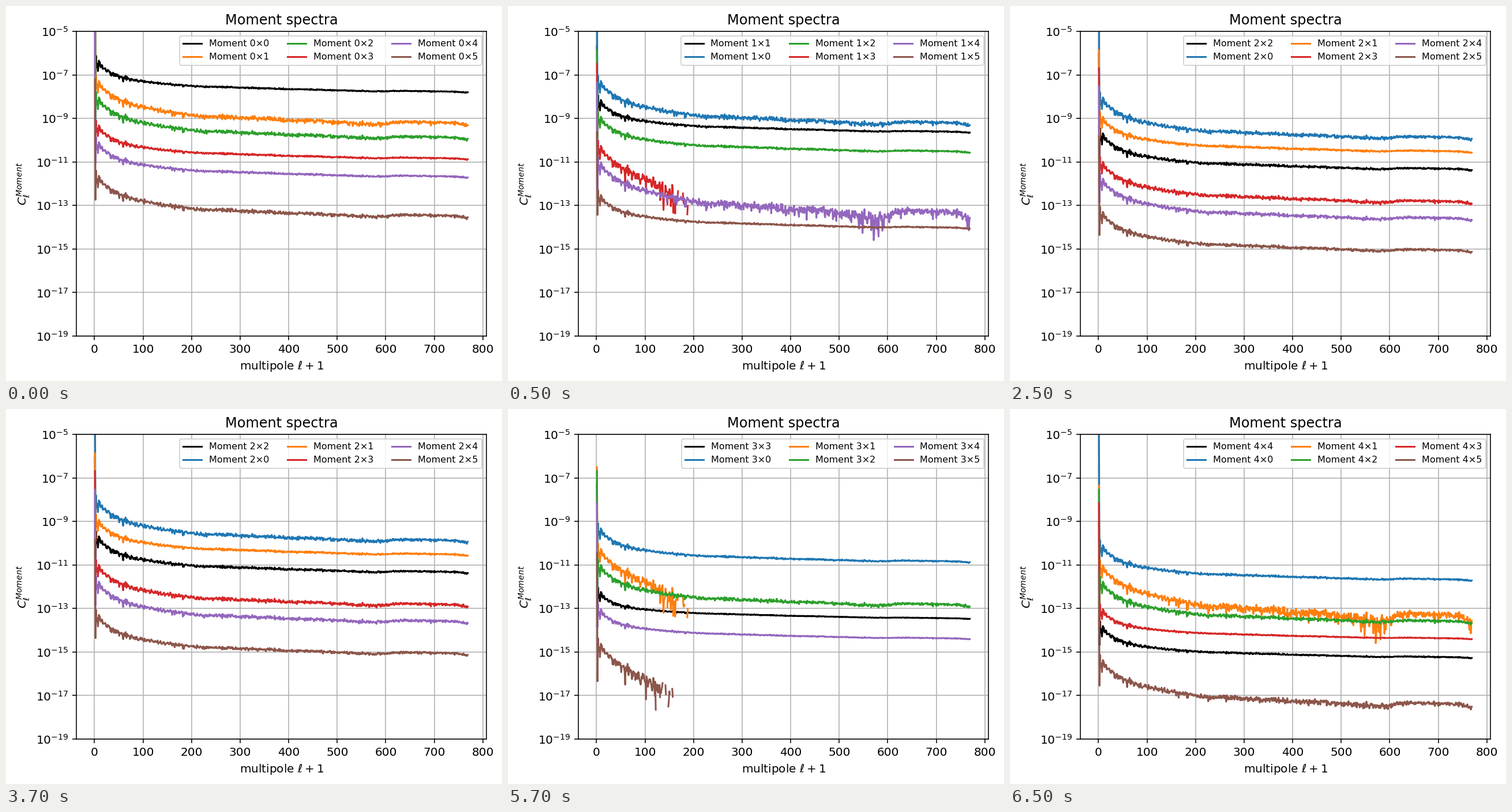
A matplotlib script for the animation above (8 s loop, 860 by 651 pixels).

```python
import numpy as np
import matplotlib.pyplot as plt
from matplotlib.animation import FuncAnimation

WIDTH, HEIGHT, DPI = 860, 651, 144
STEP, FRAMES, MOMENTS = 500, 16, 6

# log10 scale of each moment on the sky and in the monopole
SKY = [-3.24, -4.14, -4.90, -6.20, -6.97, -8.50]
MONOPOLE = [-0.4, -2.84, -3.03, -3.66, -4.51, -6.8]

# How strongly the noise floor of moment i couples to moments i, i+1, ...
COUPLING = [
    [0.36, -0.26, -0.20, 0.17, 0.08, -0.20],
    [0.28, 0.06, -0.66, -0.41, 0.20],
    [0.0, -0.19, -0.19, -0.14],
    [1.0, 0.55, -0.72],
    [0.34, -0.31],
]

rng = np.random.default_rng(12)
multipole = np.arange(1, 770)
modes = 2 * multipole - 1
scatter = np.sqrt(2 / modes)

ripple = np.interp(multipole, [60, 120, 220, 300, 450, 570, 640, 740, 769],
                   [0, -0.006, -0.005, 0, 0, -0.003, 0.002, 0.002, -0.002])
sky = 10 / np.maximum(multipole, 10) + 0.015 + ripple
sky *= rng.chisquare(modes) / modes
sky[1] = 0.13
sky[58] *= 0.55
floor = 0.15 * (1 + multipole / 180) ** -0.58


def make_spectrum(i, j):
    """Sky signal common to all moments plus a coupled noise floor."""
    jitter = 0.25 * scatter * rng.standard_normal(multipole.size)
    jitter[:9] = 0
    power = sky + floor * (COUPLING[i][j - i] + jitter)
    spectrum = 10 ** (SKY[i] + SKY[j]) * np.where(power > 0, power, np.nan)
    spectrum[0] = 10 ** (MONOPOLE[i] + MONOPOLE[j])
    return spectrum


spectra = {(i, j): make_spectrum(i, j)
           for i in range(MOMENTS - 1) for j in range(i, MOMENTS)}
spectra[0, 3][0] = np.nan  # negative monopole

fig = plt.figure(figsize=((WIDTH + 1e-6) / DPI, (HEIGHT + 1e-6) / DPI),
                 dpi=DPI, facecolor="white")
ax = fig.add_axes([122 / WIDTH, 78 / HEIGHT, 711 / WIDTH, 529 / HEIGHT])


def draw(step):
    first = (step + 3) // 4  # a half-second page, then two seconds each
    ax.clear()
    ax.set_yscale("log")
    for second in [first] + [k for k in range(MOMENTS) if k != first]:
        color = "black" if second == first else f"C{second}"
        ax.plot(multipole, spectra[min(first, second), max(first, second)],
                color=color, label=f"Moment {first}×{second}")
    ax.set_xlim(-37.4, 807.4)
    ax.set_ylim(1e-19, 1e-5)
    ax.set_yticks([10.0 ** k for k in range(-19, -4, 2)])
    ax.minorticks_off()
    ax.grid(True)
    ax.set_title("Moment spectra")
    ax.set_xlabel(r"multipole $\ell+1$")
    ax.set_ylabel(r"$C_\ell^{Moment}$")
    ax.legend(loc="upper right", ncol=3, fontsize=8)
    return ax.lines


animation = FuncAnimation(fig, draw, frames=FRAMES, interval=STEP,
                          init_func=lambda: draw(0), repeat=True,
                          repeat_delay=0, blit=False)
plt.show()
```
